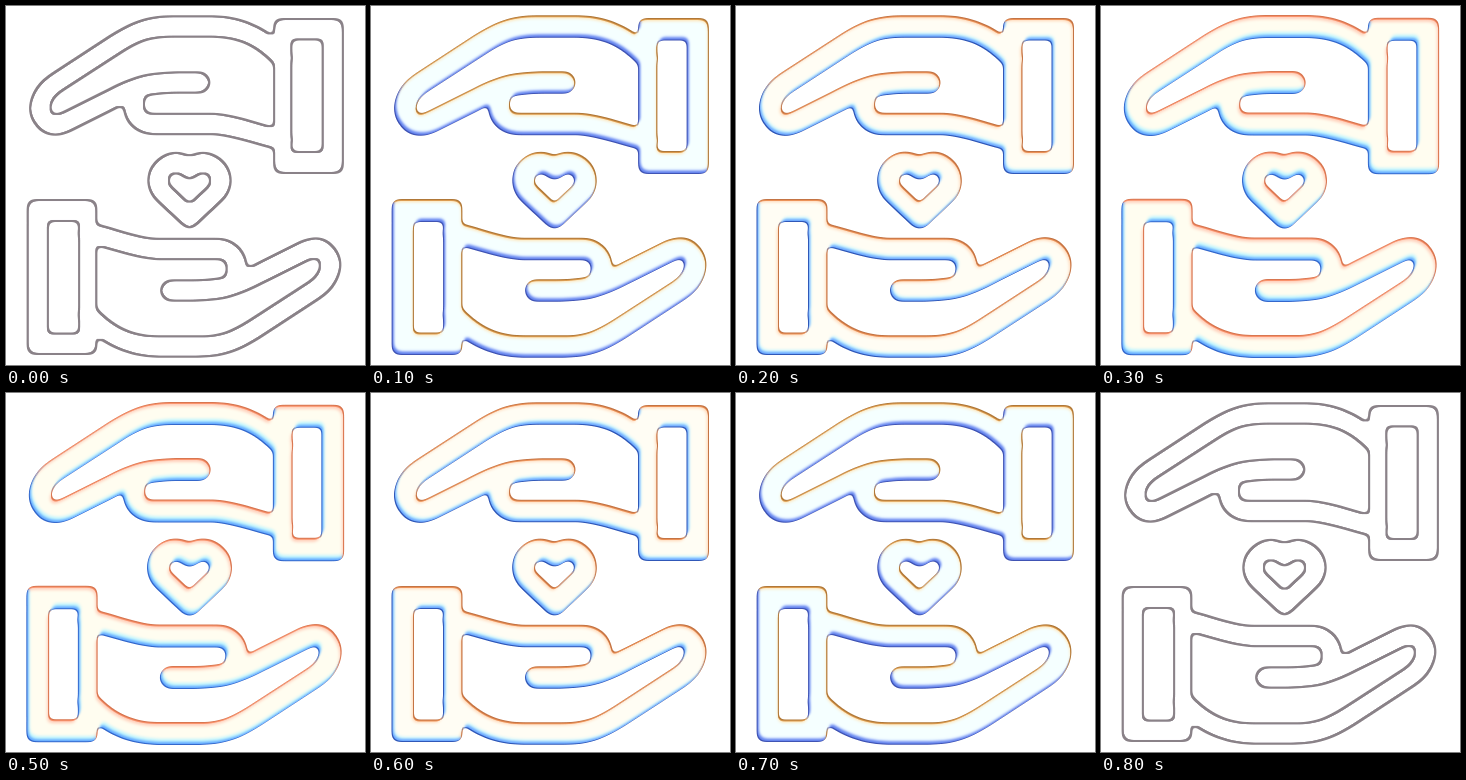
An HTML page for the animation above (0.9 s loop, 359 by 359 pixels).

```html
<!DOCTYPE html>
<html lang="en">
<head>
<meta charset="utf-8">
<title>Caring hands</title>
<style>
  html, body { margin: 0; width: 100%; height: 100%; overflow: hidden; background: #fff; }
  svg { display: block; width: 100%; height: 100%; }
  .line { fill: none; stroke: #000; stroke-linecap: round; stroke-linejoin: round;
          stroke-width: calc((20.5 + var(--grow)) * 1px); }
  .solid { fill: #000; fill-rule: evenodd; stroke: #000; stroke-linejoin: round;
           stroke-width: calc(var(--grow) * 1px); }
</style>
</head>
<body>
<svg id="stage" viewBox="0 0 359 359" xmlns="http://www.w3.org/2000/svg">
  <defs>
    <g id="hand">
      <path class="solid" d="M275 13H330Q337 13 337 20V160Q337 167 330 167H275Q268 167 268 160V20Q268 13 275 13Z
        M290 33.500Q285.500 33.500 285.500 38V141Q285.500 146 290 146H312Q316.500 146 316.500 141V38Q316.500 33.500 312 33.500Z"/>
      <path class="line" d="M276 52C260 35 240 21 208 20.500H165C142 20.500 129 26 110 38L50 77
        C35 87 30 103 38 113C43 120 51 120 60 116L103 94.500C132 79 145 77 170 76.500L193.500 76.500"/>
      <path class="line" d="M130 88C125 98 127 118 147 118H208C230 119 248 128 276 134"/>
    </g>
    <g id="art">
      <use href="#hand"/>
      <use href="#hand" transform="rotate(180 179.25 180.5)"/>
      <path class="line" d="M183.5 162.500C176 156 167 155 160 160C150 167 150 180 158 187.500L183.500 211.500
        L209 187.500C217 180 217 167 207 160C200 155 191 156 183.500 162.500Z"/>
    </g>
  </defs>
</svg>
<script>
  const STEP = 100;
  const SEQUENCE = [0, 1, 2, 3, 4, 3, 2, 1, 0];

  // Each shade is an inner shadow: dx, dy, blur, colour.
  const LOOKS = [
    { grow: 1.8, fill: '#ffffff', ring: '#8a8288', ringWidth: 2, shades: [
      [0, 0, 1.6, '#b9b4d6']] },
    { grow: 1.8, fill: '#f5ffff', ring: '#8f8496', ringWidth: 1, shades: [
      [2, -4, 1.8, '#b8ccff'], [-1.4, 2.8, 1.4, '#ffe2b0'],
      [1.5, -2.6, 0.8, '#6080ec'], [-1.1, 2, 0.6, '#dc9c50'],
      [0.8, -1.2, 0.4, '#4054b4'], [-0.7, 1, 0.4, '#b07838']] },
    { grow: 2, fill: '#fffdf4', ring: '#947c84', ringWidth: 1, shades: [
      [2.6, -5, 1.8, '#c4f4ff'], [-1.8, 3.2, 1.4, '#ffd6b4'],
      [1.7, -3, 1, '#6aa6ff'], [-1.2, 2.1, 0.6, '#ec9258'],
      [0.9, -1.4, 0.4, '#3058b8'], [-0.7, 1, 0.4, '#c47444']] },
    { grow: 2.3, fill: '#fffdf0', ring: '#987f86', ringWidth: 1, shades: [
      [2.8, -5.6, 1.8, '#bcf4ff'], [-2, 3.6, 1.4, '#ffcdb8'],
      [1.8, -3.2, 1, '#62a8ff'], [-1.3, 2.3, 0.6, '#fa926c'],
      [0.9, -1.4, 0.4, '#3468cc'], [-0.7, 1, 0.4, '#d87650']] },
    { grow: 3.6, fill: '#fffad6', ring: '#8e8088', ringWidth: 1, shades: [
      [3.8, -8, 1.8, '#d0fbdc'], [-2.8, 5.4, 1.6, '#ffd2bc'],
      [2.6, -5.2, 1.3, '#a6d0ff'], [1.6, -3, 0.9, '#7098ff'],
      [-1.6, 3, 0.9, '#ff9c84'], [0.8, -1.2, 0.4, '#4468cc'],
      [-0.8, 1.2, 0.4, '#d46c4c']] }
  ];

  const stage = document.getElementById('stage');

  function add(parent, tag, attrs) {
    const node = document.createElementNS('http://www.w3.org/2000/svg', tag);
    for (const key in attrs) node.setAttribute(key, attrs[key]);
    return parent.appendChild(node);
  }

  function addFilter(id, look) {
    const filter = add(stage, 'filter', {
      id, filterUnits: 'userSpaceOnUse', x: 0, y: 0, width: 359, height: 359,
      'color-interpolation-filters': 'sRGB'
    });
    const layers = ['fill'];
    const outside = (mask, color, result) => {
      add(filter, 'feFlood', { 'flood-color': color, result: 'paint' });
      add(filter, 'feComposite', { in: 'paint', in2: mask, operator: 'out', result });
      layers.push(result);
    };

    // Blur and sharpen the alpha to round the corners where parts meet.
    add(filter, 'feGaussianBlur', { in: 'SourceAlpha', stdDeviation: 2.5 });
    const sharpen = add(filter, 'feComponentTransfer', { result: 'shape' });
    add(sharpen, 'feFuncA', { type: 'linear', slope: 7, intercept: -3 });

    add(filter, 'feFlood', { 'flood-color': look.fill, result: 'fill' });
    add(filter, 'feMorphology', { in: 'shape', operator: 'erode', radius: look.ringWidth, result: 'core' });
    outside('core', look.ring, 'ring');
    look.shades.forEach(([dx, dy, blur, color], i) => {
      add(filter, 'feGaussianBlur', { in: 'shape', stdDeviation: blur });
      add(filter, 'feOffset', { dx, dy, result: 'moved' + i });
      outside('moved' + i, color, 'shade' + i);
    });
    // A neutral outline stays on top of the glow when there is no colour split.
    if (look.shades.length === 1) layers.push('ring');
    const merge = add(filter, 'feMerge', { result: 'all' });
    layers.forEach(layer => add(merge, 'feMergeNode', { in: layer }));
    add(filter, 'feComposite', { in: 'all', in2: 'shape', operator: 'in' });
  }

  LOOKS.forEach((look, level) => {
    addFilter('look' + level, look);
    const layer = add(stage, 'g', { filter: `url(#look${level})`, style: `--grow:${look.grow}` });
    add(layer, 'use', { href: '#art' });
    const frames = [...SEQUENCE, SEQUENCE[0]].map((shown, i) => ({
      offset: i / SEQUENCE.length,
      opacity: shown === level ? 1 : 0,
      easing: 'steps(1, end)'
    }));
    layer.animate(frames, { duration: STEP * SEQUENCE.length, iterations: Infinity });
  });
</script>
</body>
</html>
```
